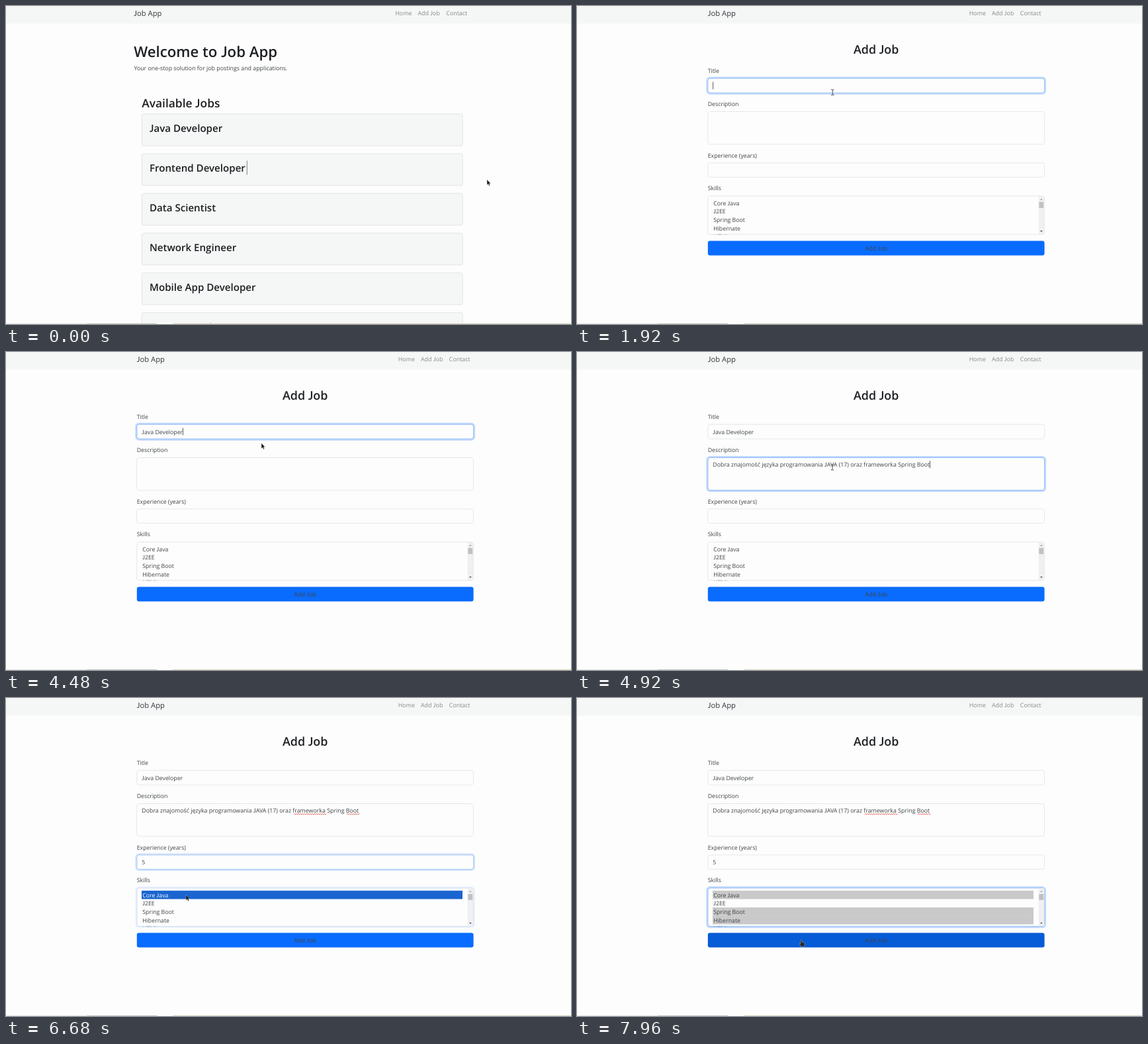
An HTML page that plays this animation: 854x480 px, repeating every 8 s.

```html
<!DOCTYPE html>
<html lang="en">
<head>
<meta charset="utf-8">
<title>Job App</title>
<style>
html, body { margin: 0; width: 100%; height: 100%; overflow: hidden; background: #fdfdfd; }
svg { display: block; width: 854px; height: 480px; }
text { font: 8.75px "Open Sans", "Noto Sans", sans-serif; fill: #3f4347; white-space: pre; text-rendering: geometricPrecision; }
.j { font-family: Lato, sans-serif; }
.brand { font-size: 11.2px; fill: #34383b; }
.link { font-size: 8.9px; fill: #878989; }
.head { font-weight: 600; fill: #1c1f22; }
.field { fill: #fdfdfd; stroke: #dfe2e5; stroke-width: .8; }
.card { fill: #f5f7f7; stroke: #dcdfdf; stroke-width: .8; }
.caret { stroke: #333; stroke-width: .8; }
.wave { fill: none; stroke: #e0443c; stroke-width: .8; }
</style>
</head>
<body>
<svg id="stage" viewBox="0 0 854 480"></svg>
<script>
const LOOP = 8000, SWITCH = 880;
const stage = document.getElementById('stage');
const $ = id => document.getElementById(id);

// The capital J sits on the baseline
const glyphs = s => s.replace(/J/g, '<tspan class="j">J</tspan>');
const text = (s, x, y, cls = '', size = 0, more = '') =>
  `<text x="${x}" y="${y}" class="${cls}" ${size ? `style="font-size:${size}px"` : ''} ${more}>${glyphs(s)}</text>`;
const box = (x, y, w, h, more = '') => `<rect x="${x}" y="${y}" width="${w}" height="${h}" ${more}/>`;
const tri = (x, y, d, more = '') => `<path d="M${x - 1.8} ${y}h3.6l-1.8 ${d * 2}z" ${more}/>`;

const nav = (dx, id) =>
  box(0, 0, 854, 26.6, 'fill="#f5f7f7"') +
  text('Job App', 197.8 + dx, 14.6, 'brand') +
  text('Home', 592.8 + dx, 14, 'link') +
  text('Add Job', 627 + dx, 14, 'link', 0, `id="${id}"`) +
  text('Contact', 669.8 + dx, 14, 'link');

const jobs = ['Java Developer', 'Frontend Developer', 'Data Scientist', 'Network Engineer', 'Mobile App Developer', ''];
const home = nav(-4.5, 'homeLink') +
  text('Welcome to Job App', 193.3, 77, 'head', 22.2) +
  text('Your one-stop solution for job postings and applications.', 193.4, 97.3, '', 8.82) +
  text('Available Jobs', 205.2, 153.3, 'head', 17.4) +
  jobs.map((s, i) => box(205.3, 162.9 + i * 60, 484.8, 48, 'rx="2.5" class="card"') +
    text(s, 217, 190 + i * 60.05, 'head', 15.1)).join('') +
  '<path d="M364.3 233.5v21.5" stroke="#777" stroke-width=".9"/>' +
  box(228, 478, 24, 2, 'rx="1" fill="#fff"') + box(308.3, 477.8, 1.4, 1.6, 'fill="#c8b98f"');

const fields = { title: [109.2, 22], desc: [159.5, 49.2], exp: [236.9, 21.6], skills: [286.8, 58] };
const field = ([id, [y, h]]) => box(197.8, y, 508.8, h, 'rx="3.4" class="field"') +
  `<g id="${id}Ring" fill="none">` +
  box(196.4, y - 1.4, 511.6, h + 2.8, 'rx="4.6" stroke="#c2dafd" stroke-width="2.2"') +
  box(197.8, y, 508.8, h, 'rx="3.4" stroke="#86b7fe" stroke-width=".9"') + '</g>';

const wave = (x0, x1) => {
  let d = `M${x0} 175.9`;
  for (let x = x0, up = 1; x < x1; x += 1.5, up = -up) d += `l1.5 ${-1.3 * up}`;
  return `<path class="wave" d="${d}"/>`;
};

const rowY = i => 290.8 + i * 12.7;
const skills = ['Core Java', 'J2EE', 'Spring Boot', 'Hibernate', 'HTML'];
const form = nav(0, 'formLink') +
  text('Add Job', 452.2, 72.4, 'head', 17.9, 'text-anchor="middle"') +
  text('Title', 197.7, 101.2) + text('Description', 197.7, 150.7) +
  text('Experience (years)', 197.7, 228.8) + text('Skills', 197.7, 278.2) +
  Object.entries(fields).map(field).join('') +
  text('', 205.3, 123.6, '', 0, 'id="titleText"') +
  text('', 205.3, 173.4, '', 8.82, 'id="descText"') +
  text('', 205.3, 250.7, '', 0, 'id="expText"') +
  `<g id="waves">${wave(435, 484)}${wave(515, 534)}</g>` +
  '<path id="caret" class="caret"/>' +
  '<g id="spin">' + box(691, 240.6, 7.4, 14, 'fill="#efefef"') +
  tri(694.7, 245.6, -1, 'fill="#444"') + tri(694.7, 249.6, 1, 'fill="#444"') + '</g>' +
  '<clipPath id="listClip">' + box(198, 287, 508, 58.3) + '</clipPath>' +
  '<g id="list" clip-path="url(#listClip)">' +
  skills.map((s, i) => box(205, rowY(i), 485, 12.7, `id="row${i}"`) +
    text(s, 206.2, rowY(i) + 9.8, '', 0, `id="opt${i}"`)).join('') + '</g>' +
  box(697.6, 287.3, 8.7, 57, 'rx="1.5" fill="#f0f0f0"') +
  tri(701.9, 292.8, -1, 'fill="#999"') + tri(701.9, 339, 1, 'id="down"') +
  box(698.4, 295.8, 6.8, 9.2, 'id="thumb" fill="#c1c1c1"') +
  box(197.8, 354.5, 508.8, 22, 'id="button" rx="3.2"') +
  text('Add Job', 452.2, 368.9, '', 9, 'text-anchor="middle" style="fill:#fff"') +
  '<g id="status">' + box(-3, 467.5, 19, 14, 'rx="2" fill="#d2d3d4"') +
  text('l-job', -0.6, 475.8, '', 5.8) + '</g>';

const cursors = {
  arrow: '<path d="M0 0V8.2L1.9 6.6 3.1 9.4 4.5 8.8 3.3 6.1H5.6z" fill="#1a1a1a" stroke="#fff" stroke-width=".3"/>',
  hand: '<path d="M-1 .9Q0-.5 1 .9V3.8l3.2.9q1.4.4 1.2 1.9L4.6 9.4V11H-.8V9.7L-2.9 6.8q-.3-1.3.9-1.1l1 .9z" fill="#2a2a2a" stroke="#fff" stroke-width=".3"/>',
  beam: '<path d="M-2.3-4h1.8l.5.4.5-.4h1.8M0-3.6V3.6M-2.3 4h1.8l.5-.4.5.4h1.8" fill="none" stroke="#444" stroke-width=".9"/>'
};

stage.innerHTML = box(0, 0, 854, 480, 'fill="#fdfdfd"') +
  `<g id="home">${home}</g><g id="form">${form}</g>` +
  box(0, 478.9, 122, 1.1, 'fill="#e8e8e6"') + box(122, 478.9, 106, 1.1, 'fill="#c9c9c1"') +
  box(252, 478.9, 602, 1.1, 'fill="#dad8c2"') +
  '<g id="cursor">' + Object.entries(cursors).map(([k, d]) => `<g id="${k}">${d}</g>`).join('') + '</g>';

// time, x, y of the pointer
const path = [
  [0, 727, 262], [200, 736, 238], [480, 700, 120], [760, 640, 18], [840, 638.5, 16], [960, 638.5, 16],
  [1240, 520, 80], [1560, 390, 146], [1740, 390, 146], [1960, 386, 129],
  [4420, 386, 129], [4640, 386, 174], [4960, 386, 174], [5240, 384, 247],
  [5800, 384, 247], [5980, 308, 279.5], [6160, 308, 279.5], [6560, 272, 297],
  [6760, 272, 297], [7080, 276, 321], [7220, 276, 321], [7400, 277, 334],
  [7500, 277, 334], [7880, 339, 364.5], [LOOP, 339, 364.5]
];
const focus = [[1780, 'title'], [4600, 'desc'], [5300, 'exp'], [6640, 'skills']];
const keys = [2440, 2560, 2720, 2800, 2960, 3120, 3240, 3400, 3440, 3600, 3720, 3920, 4000, 4000];
const title = 'Java Developer';
const desc = 'Dobra znajomość języka programowania JAVA (17) oraz frameworka Spring Boot';
const PASTE = 4760, DIGIT = 5600, LOADED = 1040, BLUR = 7940;
const picks = { 0: 6640, 2: 7120, 3: 7420 };

const clamp = v => Math.max(0, Math.min(1, v));
const ramp = (t, from) => clamp((t - from) / 150);
const show = (id, on) => { $(id).style.display = on ? '' : 'none'; };

function pointer(t) {
  const i = Math.max(1, path.findIndex(p => p[0] > t));
  const [t0, x0, y0] = path[i - 1], [t1, x1, y1] = path[i];
  const u = (t - t0) / (t1 - t0), e = u * u * (3 - 2 * u);
  return [x0 + (x1 - x0) * e, y0 + (y1 - y0) * e];
}

function shape(t, x, y) {
  const dx = t < SWITCH ? -4.5 : 0;
  if (y < 19 && x > 626 + dx && x < 662 + dx) return 'hand';
  if (t < SWITCH || x < 198 || x > 706) return 'arrow';
  if (y > 354 && y < 377) return 'hand';
  const typed = ['title', 'desc', 'exp'].some(k => y > fields[k][0] && y < fields[k][0] + fields[k][1]);
  return typed ? 'beam' : 'arrow';
}

const shown = {};
function setText(id, s) {
  if (shown[id] === s) return;
  shown[id] = s;
  $(id).innerHTML = glyphs(s);
}

function drawCaret(t) {
  const now = focus.filter(f => f[0] <= t).pop();
  const id = now && now[1];
  const typing = id && id !== 'skills';
  const last = typing && Math.max(now[0], ...[...keys, PASTE, DIGIT].filter(k => k <= t));
  const on = typing && (t - last) % 1000 < 500;
  show('caret', on);
  if (!on) return;
  const el = $(id + 'Text');
  const x = 205.6 + (shown[el.id] ? el.getComputedTextLength() : 0);
  $('caret').setAttribute('d', `M${x} ${+el.getAttribute('y') - 9}v11`);
}

function drawForm(t) {
  focus.forEach(([start, id], i) => {
    const end = i < 3 ? focus[i + 1][0] : LOOP;
    $(id + 'Ring').setAttribute('opacity', ramp(t, start) - ramp(t, end));
  });
  setText('titleText', title.slice(0, keys.filter(k => k <= t).length));
  setText('descText', t >= PASTE ? desc : '');
  setText('expText', t >= DIGIT ? '5' : '');
  show('waves', t >= 5340);
  show('spin', t >= 5200 && t < 6640);
  show('list', t >= LOADED);
  show('thumb', t >= LOADED);
  $('down').setAttribute('fill', t >= LOADED ? '#444' : '#999');
  skills.forEach((s, i) => {
    const on = t >= picks[i], blue = on && t < BLUR;
    $('row' + i).setAttribute('fill', !on ? 'none' : blue ? '#1a64d0' : '#c9c9c9');
    $('opt' + i).style.fill = blue ? '#fff' : '';
  });
  show('status', t < 1160);
  drawCaret(t);
}

function draw(t) {
  const [x, y] = pointer(t), kind = shape(t, x, y);
  show('home', t < SWITCH);
  show('form', t >= SWITCH);
  const onLink = kind === 'hand' && y < 30;
  $('homeLink').style.fill = $('formLink').style.fill = onLink ? '#5c5f60' : '';
  if (t >= SWITCH) drawForm(t);
  const h = ramp(t, 7780), mix = (a, b) => Math.round(a + (b - a) * h);
  $('button').setAttribute('fill', `rgb(${mix(10, 6)},${mix(108, 91)},${mix(254, 214)})`);
  $('cursor').setAttribute('transform', `translate(${x.toFixed(2)} ${y.toFixed(2)})`);
  Object.keys(cursors).forEach(k => show(k, k === kind));
}

const start = performance.now();
function tick() {
  draw((performance.now() - start) % LOOP);
  requestAnimationFrame(tick);
}
tick();
</script>
</body>
</html>
```
